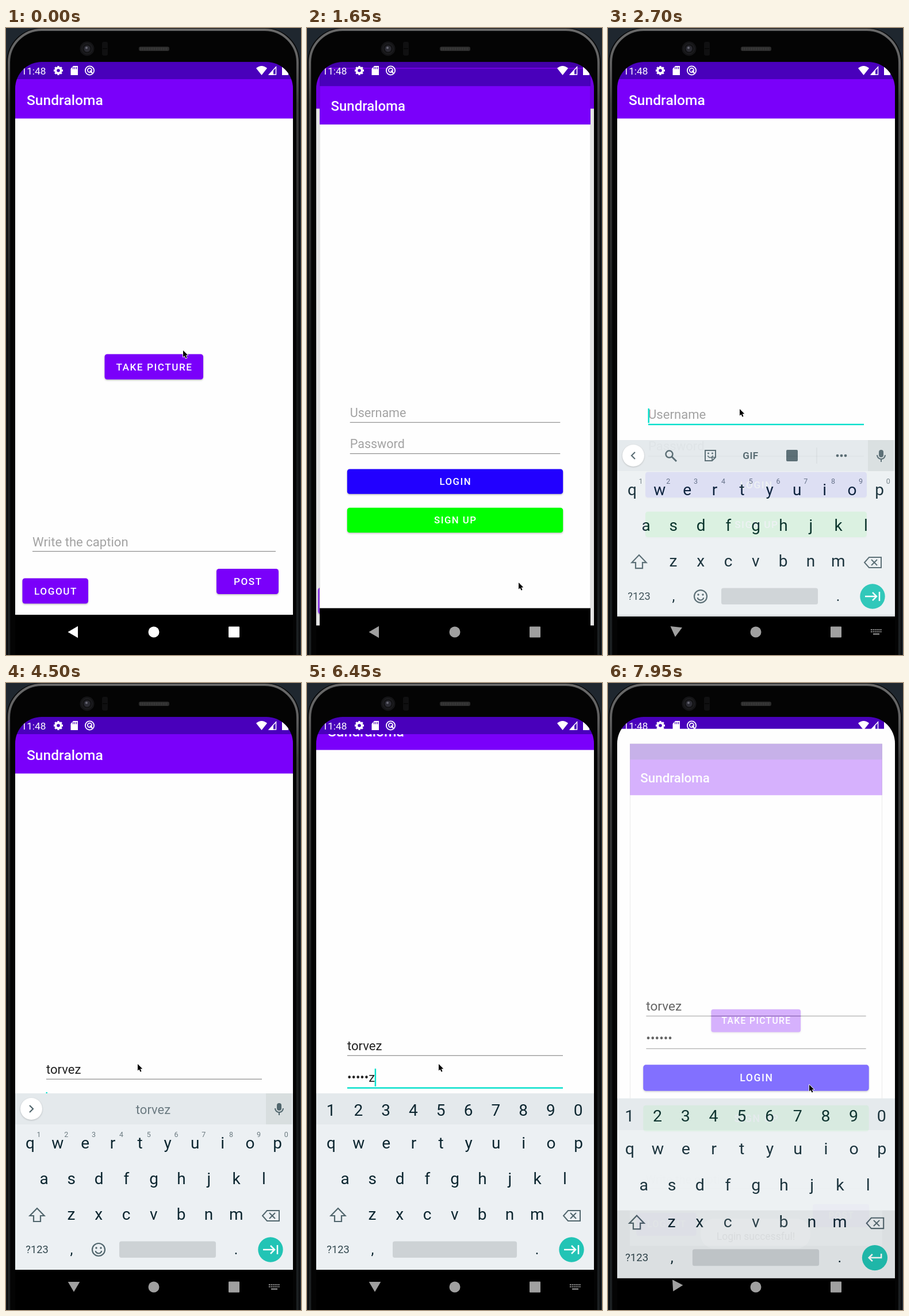
An HTML page with a canvas for the animation above (8 s loop, 513 px wide and 1091 px high).

```html
<!DOCTYPE html>
<html lang="en">
<head>
<meta charset="utf-8">
<title>Login flow</title>
<style>
html, body { margin: 0; width: 100%; height: 100%; overflow: hidden; background: #1f262d; }
canvas { display: block; }
</style>
</head>
<body>
<canvas id="stage" width="513" height="1091"></canvas>
<script>
const W = 513, H = 1091, LOOP = 8000, STEP = 150;
const stage = document.getElementById('stage').getContext('2d');
const buffer = document.createElement('canvas');
buffer.width = W;
buffer.height = H;
const bufferCtx = buffer.getContext('2d');
let c = stage;

const APP = 'Sundraloma', USER = 'torvez';
const PURPLE = '#7a00fa', STATUS = '#4900bb', TEAL = '#00dfcb';
const INK = '#0c2630', ICON = '#51666d', HINT = '#a3a3a3', LINE = '#8c8c8c';
const CX = 257.5, CY = 569;

const clamp = v => Math.max(0, Math.min(1, v));
const ramp = (t, a, b) => clamp((t - a) / (b - a));
const countBefore = (times, t) => times.filter(k => t >= k).length;

const MOUSE = [
  [0, 308, 561], [300, 313, 507], [600, 250, 690], [1050, 113, 938], [1200, 96, 974],
  [1350, 130, 975], [1650, 368, 965], [1800, 352, 890], [2100, 242, 690], [2250, 229, 663],
  [6900, 229, 663], [7350, 276, 689], [7500, 282, 691], [7800, 300, 695], [7950, 350, 699]
];
const NAME_KEYS = [3000, 3150, 3300, 3600, 3900, 4350];
const PASS_KEYS = [5100, 5250, 5400, 6150, 6300, 6450];

function rect(x, y, w, h, color) {
  c.fillStyle = color;
  c.fillRect(x, y, w, h);
}

function round(x, y, w, h, r, color) {
  c.fillStyle = color;
  c.beginPath();
  c.roundRect(x, y, w, h, r);
  c.fill();
}

function disc(x, y, r, color) {
  c.fillStyle = color;
  c.beginPath();
  c.arc(x, y, r, 0, 7);
  c.fill();
}

function ring(x, y, r, width, color) {
  c.strokeStyle = color;
  c.lineWidth = width;
  c.beginPath();
  c.arc(x, y, r, 0, 7);
  c.stroke();
}

function trace(points, close) {
  c.beginPath();
  for (let i = 0; i < points.length; i += 2) c.lineTo(points[i], points[i + 1]);
  if (close) c.closePath();
}

function poly(points, color) {
  trace(points, true);
  c.fillStyle = color;
  c.fill();
}

function line(points, color, width = 2, close = false) {
  trace(points, close);
  c.strokeStyle = color;
  c.lineWidth = width;
  c.stroke();
}

function text(s, x, y, size, color, align = 'left', weight = 400, spacing = 0) {
  c.font = `${weight} ${size}px Roboto, sans-serif`;
  c.letterSpacing = spacing + 'px';
  c.textAlign = align;
  c.fillStyle = color;
  c.fillText(s, x, y);
}

function textWidth(s, size) {
  c.font = `400 ${size}px Roboto, sans-serif`;
  c.letterSpacing = '0px';
  return c.measureText(s).width;
}

// Draws a whole window off screen, then blends it in with one opacity.
function layer(alpha, scale, dy, draw) {
  if (alpha <= 0) return;
  c = bufferCtx;
  c.setTransform(1, 0, 0, 1, 0, 0);
  c.clearRect(0, 0, W, H);
  c.setTransform(scale, 0, 0, scale, CX * (1 - scale), CY * (1 - scale) + dy);
  draw();
  c = stage;
  c.globalAlpha = alpha;
  c.drawImage(buffer, 0, 0);
  c.globalAlpha = 1;
}

function button(label, x, y, w, h, color) {
  c.save();
  c.shadowColor = 'rgba(0,0,0,.26)';
  c.shadowBlur = 3;
  c.shadowOffsetY = 1.5;
  round(x, y, w, h, 4.5, color);
  c.restore();
  text(label, x + w / 2 + .8, y + h / 2 + 6.2, 17.2, '#fff', 'center', 500, 1.53);
}

function appWindow(pan, content) {
  rect(16, 59, 483, 1021, '#000');
  c.save();
  c.beginPath();
  c.rect(16, 88, 483, 933);
  c.clip();
  c.translate(0, -pan);
  rect(16, 157, 483, 864, '#fefefe');
  rect(16, 89, 483, 68.5, PURPLE);
  text(APP, 36, 133.5, 24.6, '#fff', 'left', 500);
  content();
  c.restore();
  rect(16, 59, 483, 30, STATUS);
}

function postScreen(t) {
  const pressed = t >= 1200 && t < 2000;
  appWindow(0, () => {
    button('TAKE PICTURE', 171.5, 567.5, 171.5, 44, PURPLE);
    text('Write the caption', 46, 901.5, 22.1, HINT);
    rect(46, 910, 423, 1.2, LINE);
    button('POST', 366, 941, 108, 44, PURPLE);
    button('LOGOUT', 28.5, 957.5, 114.5, 44, pressed ? '#9940fb' : PURPLE);
  });
}

function field(y, lineY, hint, value, focused, caretTop) {
  text(value || hint, 70, y, 22.1, value ? '#222' : HINT);
  rect(70, lineY, 375, focused ? 2.4 : 1.2, focused ? TEAL : LINE);
  if (focused && caretTop) {
    rect(69.5 + textWidth(value, 22.1), caretTop, 2.4, lineY - 1.5 - caretTop, TEAL);
  }
}

function loginScreen(t) {
  const name = USER.slice(0, countBefore(NAME_KEYS, t));
  const typed = countBefore(PASS_KEYS, t);
  const last = t < 6900 && typed ? USER[typed - 1] : '';
  const pass = '•'.repeat(last ? typed - 1 : typed) + last;
  const pan = 41 * ramp(t, 4550, 4780) + 69 * ramp(t, 6840, 7120);
  const caretOff = t >= 5850 && t < 6150;
  appWindow(pan, () => {
    field(680, 688.7, 'Username', name, t >= 2400 && t < 4500, 662);
    field(735.3, 744.4, 'Password', pass, t >= 4500 && t < 6900, caretOff ? 0 : 712);
    button('LOGIN', 65, 772.5, 385, 44.5, t >= 6900 ? '#4d33ff' : '#2200ff');
    button('SIGN UP', 65, 841.5, 385, 44.5, '#00ff00');
  });
}

function microphone() {
  rect(452, 714, 45, 54, '#d8dedf');
  round(471, 731, 8, 13, 4, ICON);
  c.strokeStyle = ICON;
  c.lineWidth = 2;
  c.beginPath();
  c.arc(475, 740, 7, 0, Math.PI);
  c.stroke();
  rect(474, 747, 2, 5, ICON);
}

function toolStrip() {
  ring(106.5, 738.5, 6, 2.5, ICON);
  line([111, 743, 119, 751], ICON, 3);
  line([169, 732, 187, 732, 187, 744, 181, 750, 169, 750], ICON, 2, true);
  line([181, 750, 181, 744, 187, 744], ICON, 1.6);
  disc(174.5, 737, 1.5, ICON);
  disc(181.5, 737, 1.5, ICON);
  c.beginPath();
  c.arc(178, 740, 4.5, .2, 2.9);
  c.stroke();
  text('GIF', 248, 747, 17, ICON, 'center', 700, .5);
  round(310, 731, 20, 20, 2, ICON);
  rect(362.5, 727, 1, 28, '#cfd5d8');
  for (const x of [399, 406, 413]) disc(x, 741, 2.4, ICON);
}

function suggestions(name) {
  text(name, 256, 750, 22, '#6c7b82', 'center');
  if (name.length > 5) return;
  const sides = ['to', 'top', 'tot', 'told', 'tore', 'torn'];
  const n = name.length % 3;
  text(sides[n], 119, 750, 22, '#6c7b82', 'center');
  text(sides[n + 3], 393, 750, 22, '#6c7b82', 'center');
}

function keyboard(t) {
  const digits = t >= 4650;
  const name = USER.slice(0, countBefore(NAME_KEYS, t));
  rect(16, 714, 483, 307, '#ecf0f3');
  rect(16, 714, 483, 54, '#e4e9ec');
  const row = (keys, x, y) => [...keys].forEach((k, i) =>
    text(k, x + i * 47.8, y, 28, INK, 'center'));

  if (digits) {
    row('1234567890', 41.5, 753);
  } else {
    [...'1234567890'].forEach((k, i) => text(k, 57 + i * 47.8, 790, 12.5, '#6b7a80', 'center'));
    c.save();
    c.shadowColor = 'rgba(0,0,0,.2)';
    c.shadowBlur = 3;
    c.shadowOffsetY = 1;
    disc(44, 741, 19, '#fff');
    c.restore();
    const d = name ? 3 : -3;
    line([44 - d, 735, 44 + d, 741, 44 - d, 747], ICON, 2.2);
    if (name) suggestions(name); else toolStrip();
    microphone();
  }

  row('qwertyuiop', 42, 809.5);
  row('asdfghjkl', 66, 871.5);
  row('zxcvbnm', 113.5, 933.5);

  line([54, 914, 66.5, 927, 60, 927, 60, 937, 48, 937, 48, 927, 41.5, 927], ICON, 2.2, true);
  line([454, 918, 475, 918, 475, 936, 454, 936, 446, 927], ICON, 2, true);
  line([458, 922, 468, 932], ICON, 2);
  line([468, 922, 458, 932], ICON, 2);

  text('?123', 54, 992, 18.3, '#33484f', 'center');
  text(',', 114, 994, 25, INK, 'center');
  text('.', 400, 994, 25, INK, 'center');
  if (!digits) {
    ring(161, 986, 11, 2.2, ICON);
    disc(157, 983, 1.7, ICON);
    disc(165, 983, 1.7, ICON);
    c.beginPath();
    c.arc(161, 987, 5.5, .2, 2.94);
    c.stroke();
  }
  const left = digits ? 149 : 197;
  round(left, 971.5, 365 - left, 28.5, 3.5, '#cdd2d5');

  disc(460, 986, 21.7, '#22c4b5');
  if (t >= 6900) {
    line([471, 979, 471, 986, 450, 986], '#fff', 2.5);
    line([456, 980, 450, 986, 456, 992], '#fff', 2.5);
  } else {
    line([447, 986, 466, 986], '#fff', 2.5);
    line([460, 979, 467, 986, 460, 993], '#fff', 2.5);
    line([472, 978, 472, 994], '#fff', 2.5);
  }
}

function statusIcons() {
  const white = '#fff';
  text('11:48', 26.5, 80.5, 17.2, white);
  ring(91, 74, 4.6, 3.6, white);
  for (let i = 0; i < 8; i++) {
    const a = i * Math.PI / 4, x = Math.cos(a), y = Math.sin(a);
    line([91 + 5 * x, 74 + 5 * y, 91 + 8 * x, 74 + 8 * y], white, 3.4);
  }
  poly([117, 66, 125, 66, 125, 82, 112.5, 82, 112.5, 71], white);
  for (const x of [116, 119, 122]) rect(x, 68, 1.3, 3.5, STATUS);
  ring(145.5, 74, 7.6, 1.8, white);
  ring(145.5, 73.5, 3.6, 1.8, white);
  line([146, 74, 150.5, 79], white, 2.2);
  c.fillStyle = white;
  c.beginPath();
  c.moveTo(444.5, 82);
  c.lineTo(435, 70);
  c.quadraticCurveTo(444.5, 62, 454, 70);
  c.fill();
  line([457.5, 81, 469.5, 81, 469.5, 68], white, 1.5, true);
  poly([457, 82, 465, 82, 465, 73], white);
  poly([480, 68, 483, 68, 483, 66, 487, 66, 487, 68, 491, 68, 491, 82, 480, 82], white);
}

function navIcons(t, turn, hasKeyboard) {
  const v = Math.round(255 - 95 * ramp(t, 250, 650));
  const color = `rgb(${v},${v},${v})`;
  c.save();
  c.translate(118, 1051 - 2 * Math.sin(turn * Math.PI / 2));
  c.rotate(-turn * Math.PI / 2);
  poly([-10.5, 0, 7, -10.3, 7, 10.3], color);
  c.restore();
  disc(257, 1051, 9.5, color);
  round(387, 1041.5, 19, 19, 1, color);
  if (!hasKeyboard) return;
  for (let i = 0; i < 6; i++) {
    rect(457 + i * 3.3, 1046, 2, 2, color);
    rect(457 + i * 3.3, 1049.5, 2, 2, color);
  }
  rect(461, 1053.5, 11, 2, color);
}

function phoneBody() {
  rect(0, 0, W, H, '#1f272f');
  round(1, 0, 510, 1160, 60, '#08090a');
  const metal = c.createLinearGradient(0, 0, 0, H);
  metal.addColorStop(0, '#6a6a6a');
  metal.addColorStop(.05, '#626262');
  metal.addColorStop(.12, '#3c3c3c');
  metal.addColorStop(.35, '#292a2a');
  metal.addColorStop(.5, '#141616');
  metal.addColorStop(1, '#1c2022');
  c.strokeStyle = metal;
  c.lineWidth = 4;
  c.beginPath();
  c.roundRect(5, 3, 502, 1160, 57);
  c.stroke();
  round(8, 7, 496, 1160, 53, '#040404');
  disc(141, 36, 12.5, '#141416');
  ring(141, 36, 9, 1, '#242428');
  disc(141, 36, 5.5, '#2c2c34');
  disc(140, 34.5, 2, '#686874');
  round(167, 24, 10, 24, 3, '#101011');
  rect(168, 35, 8, 1.5, '#050505');
  round(231, 32.5, 53, 7.5, 3, '#2c2c2c');
  for (let x = 234; x < 282; x += 3) rect(x, 34, 1, 4.5, '#434343');
}

function pointer(t) {
  let i = 1;
  while (i < MOUSE.length - 1 && MOUSE[i][0] < t) i++;
  const [t0, x0, y0] = MOUSE[i - 1], [t1, x1, y1] = MOUSE[i];
  const p = ramp(t, t0, t1);
  c.save();
  c.translate(x0 + (x1 - x0) * p, y0 + (y1 - y0) * p);
  c.scale(.85, .85);
  c.lineJoin = 'round';
  const arrow = [0, 0, 0, 13.5, 3, 10.8, 5.3, 16, 7.7, 15, 5.4, 9.9, 9.7, 9.7];
  line(arrow, '#fff', 2, true);
  poly(arrow, '#000');
  c.restore();
}

// New window grows from 85%, the old one swells to 105%.
function openWindow(t, start, from, to) {
  const x = t - start;
  const p = x > 500 ? 1 : 1 - Math.exp(-.0063 * Math.max(0, x));
  if (p < 1) layer(1, 1 + .05 * p, 0, () => from(t));
  if (x <= 0) return 1;
  if (p < 1) rect(16, 59, 483, 1021, `rgba(0,0,0,${.1 * ramp(x, 150, 270)})`);
  layer(clamp(x / 260), .85 + .15 * p, 0, () => to(t));
  return 1 + .05 * p;
}

function toast() {
  round(161, 932, 191, 52, 24, 'rgba(255,255,255,.12)');
  text('Login successful!', 257, 969, 17.5, 'rgba(30,40,40,.06)', 'center');
}

function draw(t) {
  c = stage;
  phoneBody();
  c.save();
  c.beginPath();
  c.roundRect(16, 59, 483, 1032, [46, 46, 0, 0]);
  c.clip();
  rect(16, 59, 483, 1032, '#000');

  const leaving = t >= 7900;
  const scale = t < 4000
    ? openWindow(t, 1366, postScreen, loginScreen)
    : openWindow(t, 7872, loginScreen, postScreen);

  const shown = t < 2530 ? 0 : t > 2830 ? 1 : 1 - Math.exp(-.0156 * (t - 2530));
  if (leaving) layer(.93, scale, 6, () => keyboard(t));
  else layer(shown, 1, 43 * (1 - shown), () => keyboard(t));
  if (leaving) toast();

  statusIcons();
  navIcons(t, leaving ? .7 : shown, shown > 0 && !leaving);
  c.restore();
  pointer(t);
}

function tick(now) {
  draw(Math.floor((now % LOOP) / STEP) * STEP);
  requestAnimationFrame(tick);
}
requestAnimationFrame(tick);
</script>
</body>
</html>
```
